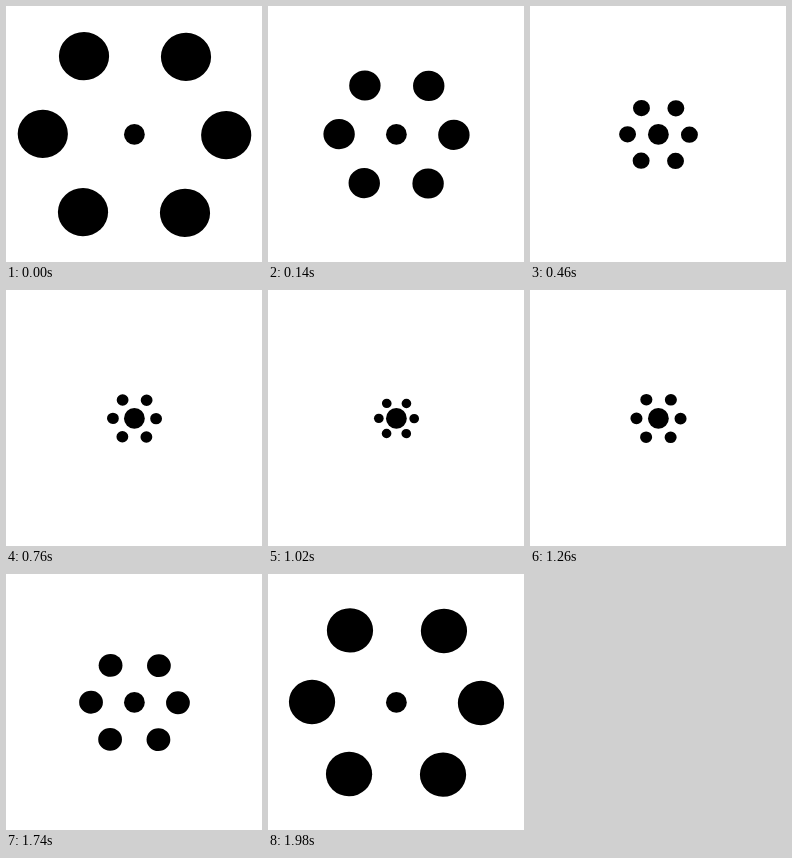
An HTML page for the animation above (2000 ms loop, 256x256 px).

```html
<!DOCTYPE html>
<html lang="en">
<head>
<meta charset="utf-8">
<title>Dots</title>
<style>
  html, body { margin: 0; width: 100%; height: 100%; overflow: hidden; background: #fff; }
  svg { display: block; width: 100vw; height: 100vh; }
</style>
</head>
<body>
<svg viewBox="0 0 256 256">
  <g id="ring"></g>
  <ellipse cx="128.4" cy="128.4" rx="10.4" ry="10.3"/>
</svg>
<script>
const LOOP = 2000, STEP = 20, DEPTH = 4.27;
const ring = document.getElementById('ring');

function addDot(x, y) {
  const dot = document.createElementNS('http://www.w3.org/2000/svg', 'ellipse');
  const attrs = { cx: x, cy: y, rx: 25.1, ry: 24.1 };
  for (const name in attrs) dot.setAttribute(name, attrs[name]);
  ring.append(dot);
}

for (const side of [-1, 1]) {
  addDot(side * 91.7, 0);
  addDot(side * 51, -78);
  addDot(side * 51, 78);
}

// The ring recedes and returns at constant speed, in perspective.
function draw(ms) {
  const t = Math.floor((ms % LOOP) / STEP) * STEP;
  const distance = 1 - Math.abs(1 - t / (LOOP / 2));
  const scale = 1 / (1 + DEPTH * distance);
  ring.setAttribute('transform', `translate(128.5 128.5) rotate(0.37) scale(${scale})`);
}

let start;
function tick(now) {
  start ??= now;
  draw(now - start);
  requestAnimationFrame(tick);
}
draw(0);
requestAnimationFrame(tick);
</script>
</body>
</html>
```
